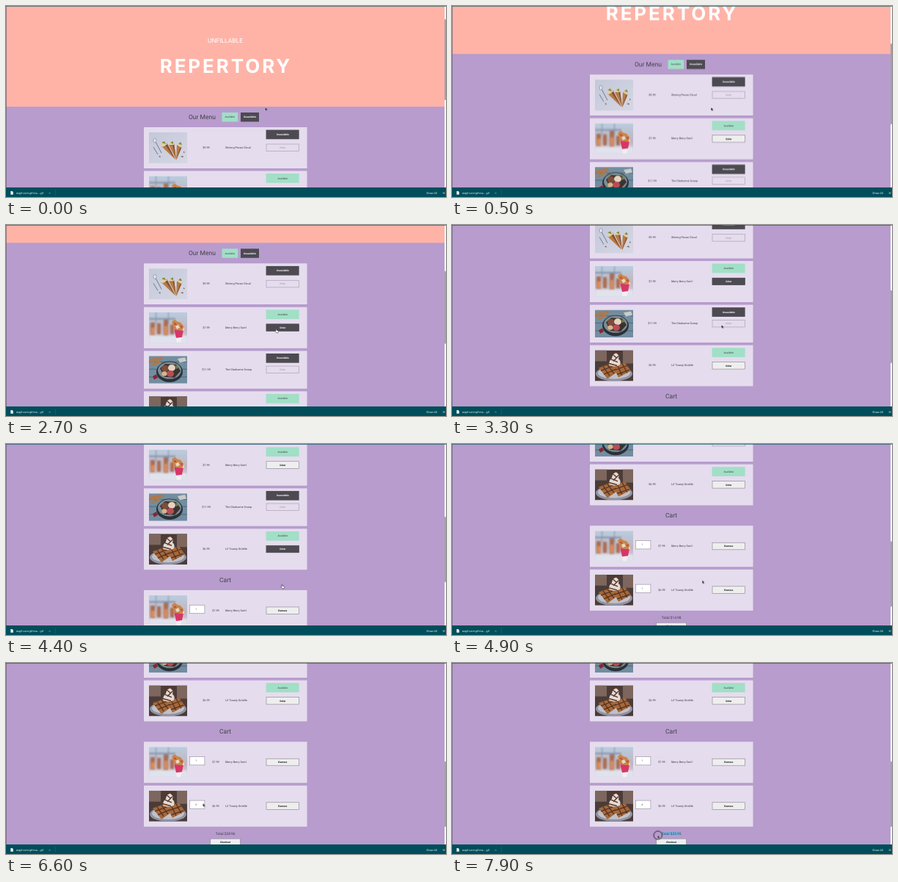
Write an HTML page that moves like this. It is 600 by 260 pixels and loops after 8000 ms.

```html
<!DOCTYPE html>
<html lang="en">
<head>
<meta charset="utf-8">
<title>Dessert menu</title>
<style>
html, body { margin: 0; width: 600px; height: 260px; overflow: hidden; background: #b79ccd; }
svg { display: block; }
text { font: 3.8px Roboto, Arial, sans-serif; fill: #3f3c44; text-rendering: geometricPrecision; }
.mid { text-anchor: middle; }
.head { font-size: 8.5px; fill: #444048; }
.brand { font-size: 8.5px; fill: #fff; }
.hero { font: 700 26px Inter, "Open Sans", sans-serif; letter-spacing: 2.9px; fill: #fff; }
.small { font-size: 3.4px; }
.bold { font-weight: 700; font-size: 3.3px; fill: #111; }
.white { fill: #fff; }
.faint { font-size: 3.3px; fill: #9b93a3; }
.total { font-size: 4.8px; }
.bar text { fill: #e6f0f1; }

.page, .thumb, .cursor, .hand, .arrow, .ring, .pick, .hover, .n { animation: 8s linear infinite; }
.page { animation-name: scroll; }
.thumb { animation-name: thumb; }
.cursor { animation-name: move; }
.hand, .arrow, .ring, .hover, .n { animation-timing-function: step-end; }
.hand { animation-name: hand; }
.arrow { animation-name: arrow; }
.ring { animation-name: ring; }
.pick { animation-name: pick; transform-origin: 311.5px 0; }
.hover.a { animation-name: hoverA; }
.hover.b { animation-name: hoverB; }
.n1 { animation-name: n1; }
.n2 { animation-name: n2; }
.n3 { animation-name: n3; }
.n4 { animation-name: n4; }

@keyframes scroll {
  0%, 1.25% { transform: translateY(0); }
  6.25% { transform: translateY(-71.5px); animation-timing-function: ease-out; }
  10%, 32.5% { transform: translateY(-107.5px); animation-timing-function: ease-in-out; }
  39%, 52% { transform: translateY(-175.5px); animation-timing-function: ease-in; }
  55% { transform: translateY(-223.5px); animation-timing-function: ease-out; }
  62.5%, 100% { transform: translateY(-315.5px); }
}
/* The thumb shrinks each time the cart makes the page longer. */
@keyframes thumb {
  0%, 1.25% { transform: translateY(18px); height: 110px; }
  6.25% { transform: translateY(51px); animation-timing-function: ease-out; }
  10%, 30% { transform: translateY(67px); height: 110px; }
  30.01%, 32.5% { transform: translateY(60.5px); height: 99px; animation-timing-function: ease-in-out; }
  39%, 48.75% { transform: translateY(88.5px); height: 99px; }
  48.76%, 52% { transform: translateY(81px); height: 89px; animation-timing-function: ease-in; }
  55% { transform: translateY(99px); animation-timing-function: ease-out; }
  62.5%, 100% { transform: translateY(134px); height: 89px; }
}
@keyframes move {
  0% { transform: translate(353.5px, 138px); }
  12.5% { transform: translate(353px, 138px); animation-timing-function: ease-in-out; }
  20% { transform: translate(349.5px, 183.5px); animation-timing-function: ease-in-out; }
  27.5%, 32% { transform: translate(368px, 143px); }
  38%, 41.5% { transform: translate(367.5px, 136px); animation-timing-function: ease-in-out; }
  47%, 58% { transform: translate(376px, 191px); animation-timing-function: ease-in-out; }
  66%, 67.5% { transform: translate(275px, 175px); animation-timing-function: ease-in-out; }
  72%, 87% { transform: translate(268.5px, 191px); animation-timing-function: ease-in-out; }
  91%, 92% { transform: translate(311.5px, 233px); }
  98%, 100% { transform: translate(280.5px, 234.5px); }
}
@keyframes hand { 0% { opacity: 0; } 26.5% { opacity: 1; } 34% { opacity: 0; } 46% { opacity: 1; } 57% { opacity: 0; } }
@keyframes arrow { 0% { opacity: 1; } 26.5% { opacity: 0; } 34% { opacity: 1; } 46% { opacity: 0; } 57% { opacity: 1; } }
@keyframes ring { 0% { opacity: 0; } 92%, 100% { opacity: 1; } }
@keyframes pick { 0%, 92% { transform: scaleX(0); } 97.5%, 100% { transform: scaleX(1); } }
@keyframes hoverA { 0% { opacity: 0; } 26.5% { opacity: 1; } 42.5% { opacity: 0; } }
@keyframes hoverB { 0% { opacity: 0; } 46% { opacity: 1; } 58% { opacity: 0; } }
@keyframes n1 { 0% { opacity: 1; } 75%, 100% { opacity: 0; } }
@keyframes n2 { 0% { opacity: 0; } 75% { opacity: 1; } 80%, 100% { opacity: 0; } }
@keyframes n3 { 0% { opacity: 0; } 80% { opacity: 1; } 85%, 100% { opacity: 0; } }
@keyframes n4 { 0% { opacity: 0; } 85%, 100% { opacity: 1; } }
</style>
</head>
<body>
<svg width="600" height="260" viewBox="0 0 600 260">
  <defs>
    <linearGradient id="glow" x2="0" y2="1">
      <stop offset="0" stop-color="#b9cde0"/><stop offset=".55" stop-color="#c3b4bd"/><stop offset="1" stop-color="#d3dbea"/>
    </linearGradient>
    <linearGradient id="stone" x2="1" y2="1">
      <stop offset="0" stop-color="#c3c8da"/><stop offset="1" stop-color="#d6d7e4"/>
    </linearGradient>
    <filter id="soft"><feGaussianBlur stdDeviation=".8"/></filter>

    <symbol id="cones" viewBox="0 0 52 42" preserveAspectRatio="none">
      <path fill="url(#stone)" d="M0 0h52v42H0z"/>
      <path d="M9 13l8 15M6 20l6 10" stroke="#747b8c" stroke-width="1"/>
      <ellipse cx="8" cy="11" rx="2" ry="3" fill="#e6e9f0" stroke="#747b8c" stroke-width=".6"/>
      <path fill="#b77a45" d="M17 19l7-5 12 23zM27 17l7-2 3 22zM38 17l7 2-8 19z"/>
      <path fill="#825031" d="M22 17l2-3 12 23zM32 16l2-1 3 22zM43 19l2 0-8 19z"/>
      <path fill="#ddd0ad" d="M16 18q0-7 7-5l2 3-6 4zM27 17q0-7 7-4v4zM38 17q3-6 8 1l-2 3z"/>
      <path fill="#7f8c45" d="M17 14l4-2 2 4zM29 14l4-2v4zM40 16l3-3 2 4z"/>
      <path fill="#7a4937" d="M13 33l2-1 1 2zM43 33l3-1 1 2zM47 26l2 1-2 1z"/>
    </symbol>

    <symbol id="cup" viewBox="0 0 52 42" preserveAspectRatio="none">
      <path fill="url(#glow)" d="M0 0h52v42H0z"/>
      <g filter="url(#soft)">
        <path fill="#a76e54" d="M2 14h6v17H2zM11 15h5v15h-5zM20 10h6v22h-6zM29 17h5v13h-5z"/>
        <path fill="#d88d5e" d="M3 21h5v9H3zM21 19h4v12h-4z"/>
        <path fill="#8093ac" d="M0 8h36v2H0zM9 0h1v16H9zM26 0h1v16h-1z"/>
        <path fill="#e0e2ec" d="M0 32h52v10H0z"/>
      </g>
      <path fill="#f3eff0" d="M34 23l14-1-5 19h-5z"/>
      <path fill="#d73669" d="M34 23l13 2-2 9-8 1z"/>
      <path fill="#c98648" d="M31 13l4-3 4 3 4 1 4 5-1 6-11-1z"/>
      <path fill="#c94b43" d="M33 16l3-2 2 4zM42 19l4-1-1 4z"/>
      <path fill="#e5d9c5" d="M36 19l4-2 2 4-4 2z"/>
    </symbol>

    <symbol id="bowl" viewBox="0 0 52 42" preserveAspectRatio="none">
      <path fill="#728da0" d="M0 0h52v42H0z"/>
      <path stroke="#4d6879" d="M0 9h52M0 20h52M0 32h52"/>
      <path fill="#a87a52" d="M0 5l17-4 3 4-18 6zM3 13l11-7 2 4-12 6z"/>
      <path fill="#c9cbc8" d="M39 4l10-2 2 6-9 2z"/>
      <ellipse cx="28" cy="24" rx="18" ry="16" fill="#29313a"/>
      <ellipse cx="28" cy="22" rx="16" ry="13" fill="#7c8d91"/>
      <path fill="#3c3132" d="M15 19l7-7 15 1 6 10-8 10-14-1z"/>
      <circle cx="22" cy="19" r="5" fill="#7e4d3b"/>
      <circle cx="31" cy="18" r="5" fill="#e6d2bd"/>
      <circle cx="29" cy="27" r="5" fill="#b74d56"/>
      <circle cx="21" cy="27" r="3.5" fill="#d7b48d"/>
      <path fill="#6f8052" d="M36 14l5 3-4 3z"/>
      <path fill="#8b2430" d="M5 31l5-3 2 5-5 3z"/>
    </symbol>

    <symbol id="waffle" viewBox="0 0 52 42" preserveAspectRatio="none">
      <path fill="#4b3c38" d="M0 0h52v42H0z"/>
      <path fill="#7d665d" d="M0 0h16v15H0zM38 0h14v18H38z"/>
      <ellipse cx="26" cy="32" rx="25" ry="10" fill="#8e94a5"/>
      <ellipse cx="26" cy="31" rx="22" ry="8" fill="#c1c0c8"/>
      <path fill="#a4683b" d="M5 24l17-6 9 11-14 10zM24 21l17-4 8 11-17 9z"/>
      <path stroke="#56311f" stroke-width="1.3" fill="none" d="M8 28l16-6M12 33l16-7M11 22l9 13M17 20l9 12M27 27l17-6M30 33l17-6M30 20l7 14M37 18l7 13"/>
      <path fill="#e4dad4" d="M19 20q0-6 4-9 1-7 6-7 5 3 3 8 4 3 2 8-7 4-15 0z"/>
      <path stroke="#5a3427" stroke-width="1.4" fill="none" d="M23 5l7 6M21 12l10 4M19 18l11 3M32 8l-7 7"/>
      <path fill="#5a3427" d="M21 4l4-4 2 5zM30 3l5-2-2 6z"/>
    </symbol>
  </defs>

  <rect width="600" height="260" fill="#b79ccd"/>
  <g class="page">
    <rect y="-40" width="600" height="177" fill="#ffb3a7"/>
    <text class="brand mid" x="299" y="50.3">UNFILLABLE</text>
    <text class="hero mid" x="300" y="91.3">REPERTORY</text>
    <text class="head" x="249" y="154">Our Menu</text>
    <rect x="294.5" y="145" width="21.7" height="12.5" fill="#a1dfc6"/>
    <text class="small mid" x="305.3" y="152.4">Available</text>
    <rect x="320" y="145" width="25" height="12.5" fill="#4d4a52"/>
    <text class="bold white mid" x="332.5" y="152.4">Unavailable</text>
    <g id="cards"></g>
    <text class="head mid" x="299" y="411.7">Cart</text>
    <rect class="pick" x="287" y="545.3" width="24.5" height="5.6" fill="#7fb5e6"/>
    <g id="totals"></g>
    <rect x="278.7" y="554.7" width="40.8" height="9.6" fill="#eee" stroke="#85808a" stroke-width=".6"/>
    <text class="bold mid" x="299" y="560.8">Checkout</text>
  </g>

  <rect x="598" width="2" height="247" fill="#f8f5f9"/>
  <rect class="thumb" x="598" width="2" height="110" rx=".7" fill="#a5a1a9"/>
  <rect width=".7" height="247" fill="#6d6478"/>
  <rect width="600" height="1" fill="#0b5262" opacity=".6"/>

  <g class="bar">
    <rect y="247" width="600" height="13" fill="#004e5b"/>
    <path d="M6.3 252h2.2l1.3 1.3v3.5H6.3z" fill="#e6f0f1"/>
    <text x="14" y="256">ezgif.com-gif-ma....gif</text>
    <path d="M58.3 255.4l1.2-1.2 1.2 1.2" fill="none" stroke="#b9d0d4" stroke-width=".6"/>
    <path d="M67.3 250v8" stroke="#2f707b" stroke-width=".5"/>
    <text x="573.3" y="256">Show All</text>
    <path d="M595.8 253.3l2.6 2.6m0-2.6l-2.6 2.6" stroke="#e6f0f1" stroke-width=".6"/>
  </g>

  <g class="cursor">
    <circle class="ring" cx=".3" cy="0" r="5.7" fill="none" stroke="#1b1722" stroke-width=".9"/>
    <path class="arrow" d="M0 0v4.4l1-.9.8 1.7.9-.4-.8-1.6h1.4z" fill="#111" stroke="#fff" stroke-width=".3"/>
    <path class="hand" d="M0 .4q.6-.7 1 0v1.8l2.2.6q.6.4.3 1.4l-.5 1.5H.8L-.9 3.4q.2-.7.9-.1z" fill="#fff" stroke="#111" stroke-width=".5"/>
  </g>
</svg>
<script>
const box = (x, y, w, h, fill, line = 'none') =>
  `<rect x="${x}" y="${y}" width="${w}" height="${h}" fill="${fill}" stroke="${line}" stroke-width=".6"/>`;
const label = (x, y, text, cls = '') => `<text x="${x}" y="${y}" class="${cls}">${text}</text>`;
const button = (y, text, fill, line, cls) =>
  box(355, y, 44.4, 9.6, fill, line) + label(377.3, y + 6, text, cls + ' mid');

const foods = {
  cones: ['$9.99', 'Shining Pecan Cloud'],
  cup: ['$7.99', 'Merry Berry Swirl'],
  bowl: ['$11.99', 'The Gladsome Scoop'],
  waffle: ['$6.99', "Lil' Toasty Griddle"]
};

function base(food, top, height, priceX) {
  const [price, name] = foods[food], line = top + height / 2 + 0.9;
  return box(188, top, 222.5, height, '#e5dcee') +
    `<use href="#${food}" x="195" y="${top + 7}" width="52" height="${height - 14}"/>` +
    label(priceX, line, price, 'mid') + label(299, line, name);
}

function menuCard(food, top, height, open, hover) {
  const y = top + height / 2 - 5;
  let out = base(food, top, height, 273) +
    box(354.6, top + 3.6, 45, 12.7, open ? '#a1dfc6' : '#4d4a52') +
    label(377.3, top + 11.1, open ? 'Available' : 'Unavailable', open ? 'small mid' : 'bold white mid');
  out += open ? button(y, 'Order', '#eee', '#85808a', 'bold') : button(y, 'Order', 'none', '#a299aa', 'faint');
  if (hover) out += `<g class="hover ${hover}">${button(y, 'Order', '#4d4a52', '#4d4a52', 'bold white')}</g>`;
  return out;
}

const counts = [1, 2, 3, 4];
const swap = draw => counts.map(n => `<g class="n n${n}">${draw(n)}</g>`).join('');

function cartCard(food, top, amount) {
  return base(food, top, 56, 286) + box(250.3, top + 20.3, 20.6, 11.4, '#fff', '#8f8797') +
    amount(top + 27.2) + button(top + 23, 'Remove', '#eee', '#85808a', 'bold');
}

const amountAt = (y, n) => label(259.3, y, n, 'small mid');

document.getElementById('cards').innerHTML =
  menuCard('cones', 165, 56, false) +
  menuCard('cup', 224.5, 56, true, 'a') +
  menuCard('bowl', 284.1, 51.4, false) +
  menuCard('waffle', 339.1, 55.8, true, 'b') +
  cartCard('cup', 422.7, y => amountAt(y, 1)) +
  cartCard('waffle', 482.3, y => swap(n => amountAt(y, n)));

document.getElementById('totals').innerHTML =
  swap(n => label(299.2, 549.7, 'Total $' + (7.99 + 6.99 * n).toFixed(2), 'total mid'));
</script>
</body>
</html>
```
